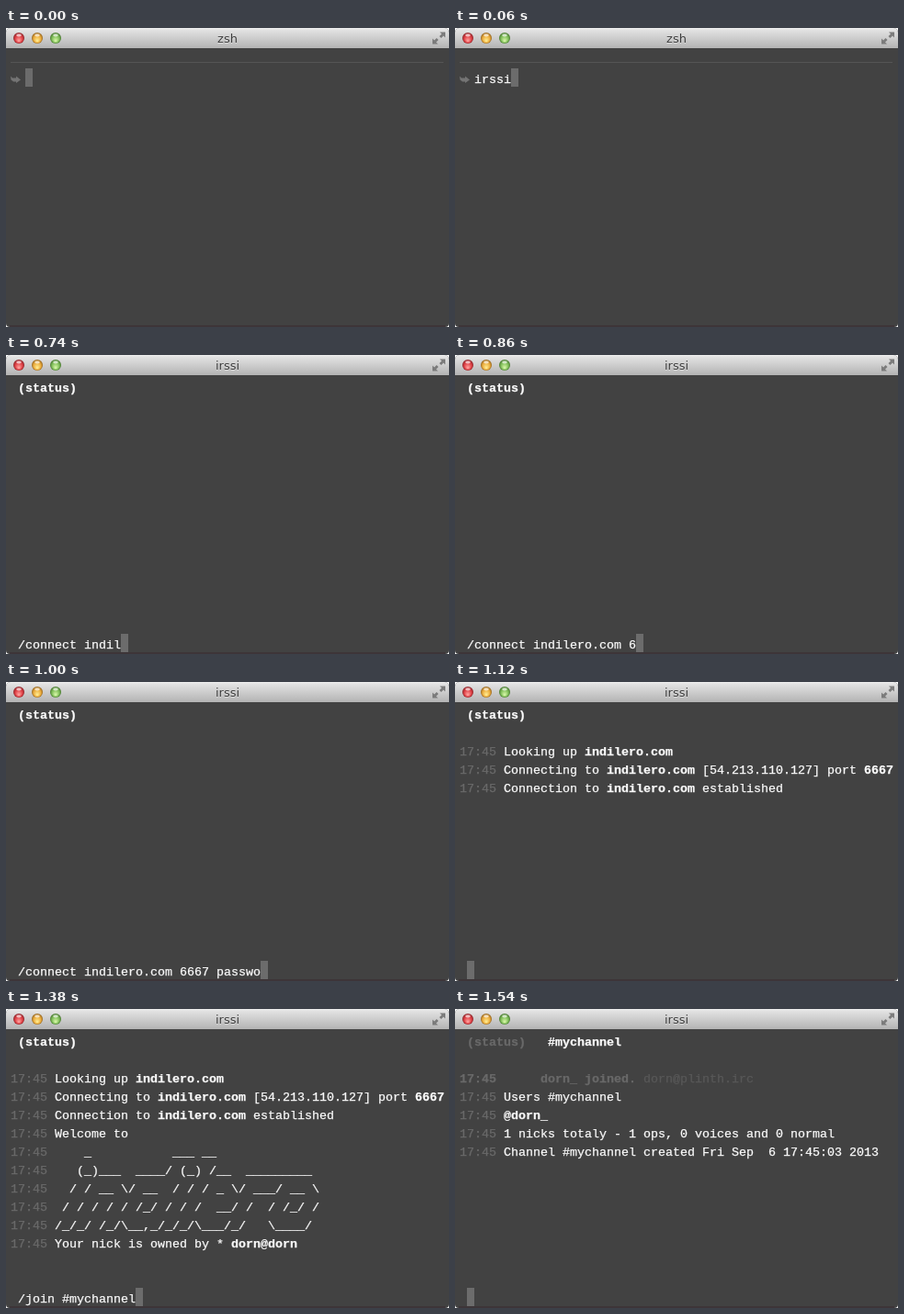
Animation of 482x326 px, one loop 2.54 s. Source, as an HTML page with a canvas:

```html
<!DOCTYPE html>
<html lang="en">
<head>
<meta charset="utf-8">
<title>Terminal</title>
<style>
html, body { margin: 0; width: 100%; height: 100%; overflow: hidden; background: #fff; }
canvas { display: block; }
</style>
</head>
<body>
<canvas id="stage" width="482" height="326"></canvas>
<script>
const W = 482, H = 326, LOOP = 2540, TICK = 20;
const CELL = 8, LINE = 20, INPUT_ROW = 14;
const WHITE = '#fafafa', DIM = '#696969', FAINT = '#585858';
const HOST = 'indilero.com', NICK = 'dorn';
const CONNECT = `/connect ${HOST} 6667 password ${NICK}`;
const JOIN = '/join #mychannel';
const BANNER = [
  '    _           ___ __',
  '   (_)___  ____/ (_) /__  _________',
  '  / / __ \\/ __  / / / _ \\/ ___/ __ \\',
  ' / / / / / /_/ / / /  __/ /  / /_/ /',
  '/_/_/ /_/\\__,_/_/_/\\___/_/   \\____/'
];
const c = document.getElementById('stage').getContext('2d');

function text(col, row, str, color = WHITE, bold = false) {
  c.font = `${bold ? 'bold ' : ''}13.333px "Liberation Mono", monospace`;
  c.textAlign = 'left';
  c.fillStyle = c.strokeStyle = color;
  c.lineWidth = 0.25;
  const x = 5 + col * CELL, y = 40 + row * LINE;
  c.fillText(str, x, y);
  c.strokeText(str, x, y);
}

function cursor(col, row) {
  c.fillStyle = '#6c6c6c';
  c.fillRect(5 + col * CELL, 24 + row * LINE, CELL, LINE);
}

// A stamped line; parts between asterisks pairs (**) are bold.
function log(row, str) {
  text(0, row, '17:45', DIM);
  let col = 6;
  str.split('**').forEach((part, i) => {
    text(col, row, part, WHITE, i % 2 === 1);
    col += part.length;
  });
}

function input(str, n = str.length) {
  n = Math.max(0, Math.min(str.length, Math.round(n)));
  text(1, INPUT_ROW, str.slice(0, n));
  cursor(1 + n, INPUT_ROW);
}

function light(x, rim, base, glow) {
  const g = c.createRadialGradient(x, 14, 0.5, x, 11, 6);
  g.addColorStop(0, glow);
  g.addColorStop(0.65, base);
  g.addColorStop(1, rim);
  c.fillStyle = g;
  c.beginPath();
  c.arc(x, 11, 6, 0, Math.PI * 2);
  c.fill();
  c.fillStyle = 'rgba(255,255,255,.65)';
  c.beginPath();
  c.ellipse(x, 7.8, 2.8, 1.6, 0, 0, Math.PI * 2);
  c.fill();
}

function shape(points, color) {
  c.fillStyle = color;
  c.beginPath();
  points.forEach(([x, y]) => c.lineTo(x, y));
  c.fill();
}

function expandIcon() {
  const arrow = [[0, 0], [6, 0], [6, 6], [4, 4], [1.5, 6.5], [-0.5, 4.5], [2, 2]];
  shape(arrow.map(([x, y]) => [472 + x, 4.5 + y]), '#7b7b7b');
  shape(arrow.map(([x, y]) => [470 - x, 17.5 - y]), '#7b7b7b');
}

function frame(title) {
  c.fillStyle = '#fff';
  c.fillRect(0, 0, W, H);
  c.fillStyle = '#424242';
  c.beginPath();
  c.roundRect(0, 0, W, H, [5, 5, 4, 4]);
  c.fill();
  c.fillStyle = '#3d3538';
  c.fillRect(4, 324, W - 8, 2);

  const bar = c.createLinearGradient(0, 0, 0, 22);
  bar.addColorStop(0, '#f0f0f0');
  bar.addColorStop(0.1, '#e2e2e2');
  bar.addColorStop(1, '#b3b3b3');
  c.fillStyle = bar;
  c.beginPath();
  c.roundRect(0, 0, W, 22, [5, 5, 0, 0]);
  c.fill();

  light(14, '#8b2529', '#dc3d43', '#ff9c98');
  light(34, '#94651f', '#eaaa3a', '#ffe98c');
  light(54, '#47772f', '#7dbb57', '#d3f5a4');
  expandIcon();

  c.font = '13px "DejaVu Sans", sans-serif';
  c.textAlign = 'center';
  c.fillStyle = 'rgba(255,255,255,.5)';
  c.fillText(title, 241, 17);
  c.fillStyle = '#3c3c3c';
  c.fillText(title, 241, 16);
}

function shell(t) {
  c.fillStyle = '#555';
  c.fillRect(5, 37, 471, 1);
  shape([[5, 52.5], [7, 54.5], [11, 54.5], [11, 52.5], [16, 56.5],
         [11, 60], [11, 58.5], [8, 58.5], [5.5, 56.5]], '#747474');
  const n = Math.min(5, Math.ceil(t / TICK * 5 / 3));
  text(2, 1, 'irssi'.slice(0, n));
  cursor(2 + n, 1);
}

function status(t) {
  text(1, 0, '(status)', WHITE, true);
  if (t < 1100) {
    const n = t < 740 ? (t - 580) * 14 / 160
      : t < 1000 ? 14 + (t - 740) * 19 / 260
      : 33 + (t - 1000) * 7 / 80;
    return input(CONNECT, n);
  }
  log(2, `Looking up **${HOST}**`);
  if (t >= 1120) {
    log(3, `Connecting to **${HOST}** [54.213.110.127] port **6667**`);
    log(4, `Connection to **${HOST}** established`);
  }
  if (t >= 1140) {
    log(5, 'Welcome to');
    BANNER.forEach((line, i) => log(6 + i, line));
    log(11, `Your nick is owned by * **${NICK}@${NICK}**`);
  }
  input(t < 1440 ? JOIN : '', (t - 1140) * 16 / 240);
}

function channel(t) {
  text(1, 0, '(status)', DIM, true);
  text(12, 0, '#mychannel', WHITE, true);
  text(0, 2, '17:45', DIM, true);
  text(11, 2, NICK + '_', DIM, true);
  text(17, 2, 'joined.', DIM, true);
  text(25, 2, NICK + '@plinth.irc', FAINT);
  if (t >= 1480) log(3, 'Users #mychannel');
  if (t >= 1500) log(4, `**@${NICK}_**`);
  if (t >= 1520) log(5, '1 nicks totaly - 1 ops, 0 voices and 0 normal');
  if (t >= 1540) log(6, 'Channel #mychannel created Fri Sep  6 17:45:03 2013');
  input('');
}

function draw(t) {
  frame(t < 580 ? 'zsh' : 'irssi');
  if (t < 560) shell(t);
  else if (t < 580) cursor(0, INPUT_ROW);
  else if (t < 1460) status(t);
  else channel(t);
}

const start = performance.now();
function tick() {
  const t = (performance.now() - start) % LOOP;
  draw(Math.floor(t / TICK) * TICK);
  requestAnimationFrame(tick);
}
tick();
</script>
</body>
</html>
```
